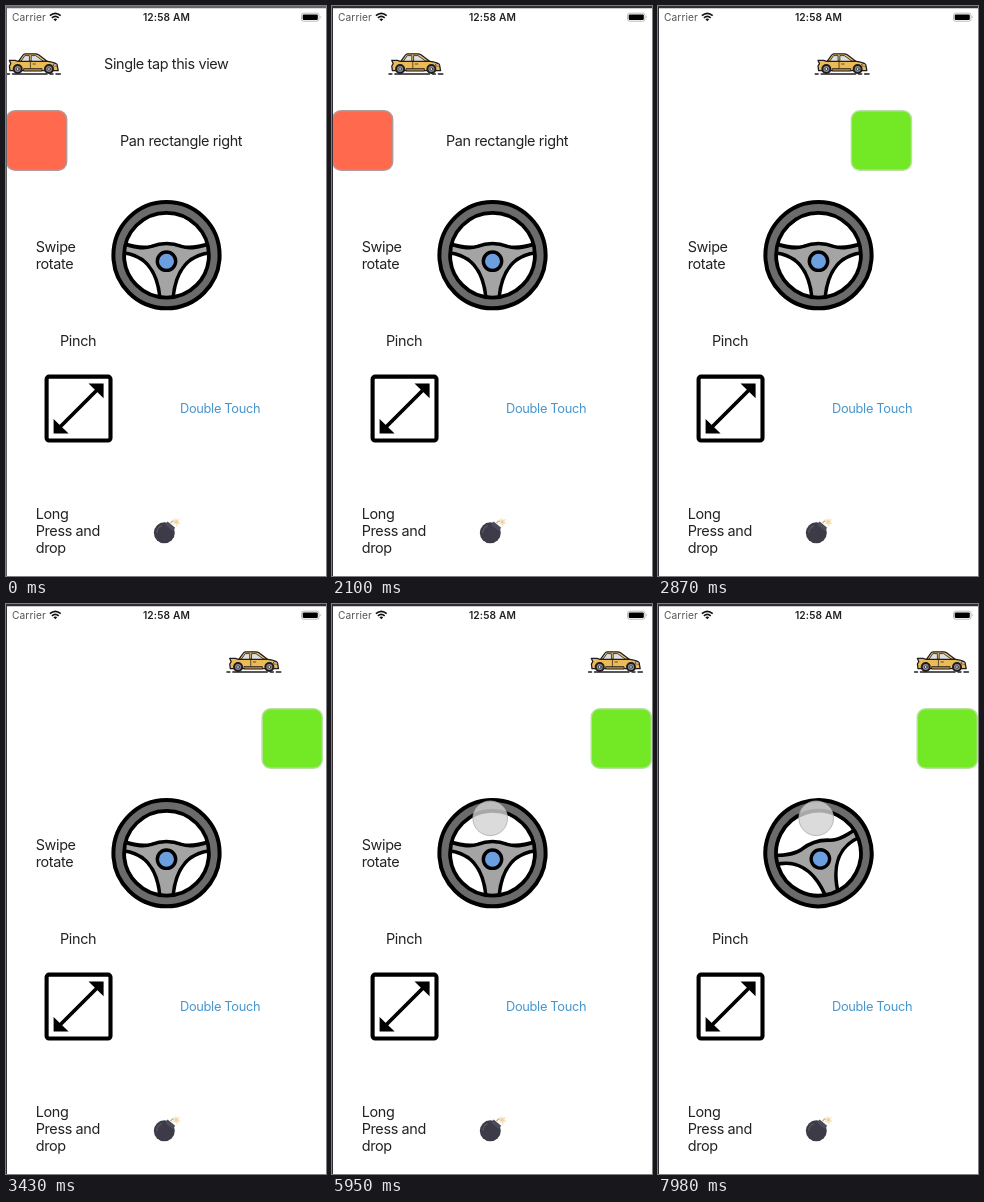
Animation of 320x570 px, one loop 8 s. Source, as an HTML page:

```html
<!DOCTYPE html>
<html lang="en">
<head>
<meta charset="utf-8">
<title>Gesture demo</title>
<style>
  html, body { margin: 0; width: 100%; height: 100%; overflow: hidden; background: #fff; }
  svg { display: block; width: 100vw; height: 100vh; }
  text { font-family: Inter, "Liberation Sans", sans-serif; font-size: 14.4px; letter-spacing: -.35px; fill: #222; }
  .status { font-size: 10.2px; letter-spacing: .1px; fill: #555; }
  .clock { font-size: 10.2px; letter-spacing: .15px; font-weight: 600; text-anchor: middle; }
  .button { font-size: 12.8px; letter-spacing: -.3px; fill: #4795cd; }
</style>
</head>
<body>
<svg viewBox="0 0 320 570">
  <rect width="320" height="570" fill="#fff"/>

  <!-- status bar -->
  <text class="status" x="6" y="15.2">Carrier</text>
  <g fill="none" stroke="#111" stroke-width="1.7">
    <path d="M43.9 9.6Q49.3 5 54.7 9.6M45.9 11.8Q49.3 8.9 52.7 11.8"/>
    <path d="M47.4 13.2Q49.3 11.6 51.2 13.2L49.3 15.2Z" fill="#111" stroke="none"/>
  </g>
  <text class="clock" x="160.5" y="15.2">12:58 AM</text>
  <rect x="295.5" y="7.2" width="17.5" height="8" rx="2.2" fill="#fff" stroke="#aaa" stroke-width=".8"/>
  <rect x="296.7" y="8.4" width="15.1" height="5.6" rx="1.2" fill="#000"/>
  <path d="M314.2 9.8q1.3 1.4 0 2.8z" fill="#999"/>

  <text id="tapLabel" x="98" y="63">Single tap this view</text>
  <text id="panLabel" x="114" y="140">Pan rectangle right</text>
  <g id="swipeLabel">
    <text x="29.7" y="246">Swipe</text>
    <text x="29.7" y="263">rotate</text>
  </g>
  <text x="54" y="339.8">Pinch</text>
  <text class="button" x="174" y="407.3">Double Touch</text>
  <text x="29.7" y="513">Long</text>
  <text x="29.7" y="530">Press and</text>
  <text x="29.7" y="547">drop</text>

  <rect id="box" x=".5" y="104.8" width="60.2" height="59.4" rx="8.5" stroke-width="1.4"/>

  <g id="car" stroke="#1f1d20" stroke-width="1.3" stroke-linejoin="round" stroke-linecap="round">
    <path d="M.6 68H3.5M6.5 68H41M44 68H47M50 68H54.4" fill="none" stroke-width="1.5"/>
    <path d="M12.5 55.4L17 49Q17.7 47.8 19.2 47.8H29.5Q31.2 47.8 32.6 48.8L41.5 55.4Z" fill="#f0c465"/>
    <path d="M15 55.2L18.9 49.6H23.4V55.2ZM25.2 55.2V49.6H29.6L37.4 55.2Z" fill="#dcdfe3" stroke-width=".8"/>
    <path d="M3.4 54.4H9L12 55.4H41.5Q48.5 56.2 51 58.4L52.2 64.6H4L3.4 60L4.8 57.6Z" fill="#ecbb55"/>
    <path d="M18 62.6H36V65H18Z" fill="#a9803f" stroke-width=".8"/>
    <path d="M24.4 56V62M27 58H29.4" fill="none" stroke-width=".7"/>
    <path d="M47.4 58H50.4L51.2 60H48Z" fill="#f8edcf" stroke-width=".6"/>
    <g fill="#8c8d94" stroke-width="2">
      <circle cx="11.7" cy="63" r="4"/>
      <circle cx="43" cy="63" r="4"/>
    </g>
    <g fill="#e8e8ea" stroke-width=".7">
      <circle cx="11.7" cy="63" r="1.4"/>
      <circle cx="43" cy="63" r="1.4"/>
    </g>
  </g>

  <!-- steering wheel, drawn around its own centre -->
  <clipPath id="inside"><circle r="43"/></clipPath>
  <g id="wheel" stroke="#000">
    <path clip-path="url(#inside)" fill="#a4a4a4" stroke-width="3.6" stroke-linejoin="round"
      d="M-46 -12.5C-34 -8.5 -24 -6 -15 -8.8Q0 -14.5 15 -8.8C24 -6 34 -8.5 46 -12.5L46 -2.5C24 -1.5 8.5 13 6.3 46H-6.3C-8.5 13 -24 -1.5 -46 -2.5Z"/>
    <circle cy="6" r="9.2" fill="#6c9fdf" stroke-width="3.4"/>
    <g fill="none">
      <circle r="47.5" stroke="#6b6b6b" stroke-width="9"/>
      <circle r="53.1" stroke-width="4"/>
      <circle r="42.4" stroke-width="3.8"/>
    </g>
  </g>

  <!-- pinch icon -->
  <rect x="40.6" y="370.6" width="63.9" height="63.9" rx="2.5" fill="#fff" stroke="#000" stroke-width="4.1"/>
  <path d="M53 422L92 383" stroke="#000" stroke-width="3.8"/>
  <path d="M97.6 377.6H82.5L97.6 392.2ZM47.6 427.6V413L62.6 427.6Z"/>

  <!-- bomb -->
  <path d="M164.5 517Q167 513.5 170 515.5" fill="none" stroke="#cbb497" stroke-width="1.4"/>
  <circle cx="158.3" cy="526.8" r="10.5" fill="#3c3b47"/>
  <path d="M161.6 515.5L169.2 521.8L166.7 525.1L159.1 518.8Z" fill="#4c4b58"/>
  <path d="M150.8 526.4Q151.4 521.4 155.4 519.8" fill="none" stroke="#56555f" stroke-width="1.4" stroke-linecap="round"/>
  <path d="M169.8 511L170.9 513.8L174 512.8L172.7 515.6L174.6 518L171.8 518L171 521L169.2 518.2L166.2 518.2L168 515.8L166.4 513L169.2 513.8Z" fill="#f7e6c4"/>
  <circle cx="170.3" cy="516" r="1.4" fill="#efcf98"/>

  <circle id="touch" cx="158.2" cy="214.3" r="17.3" fill="#d3d3d3" fill-opacity=".8" stroke="#ababab" stroke-width=".8"/>

  <path id="edge" d="M0 0H320V2.2H1V570H0Z"/>
</svg>
<script>
  const LOOP = 8000, STEP = 70;
  const TAP = 1060, PAN = 2200, TOUCH = 5600, SWIPE = 6650;
  const el = id => document.getElementById(id);
  const [tapLabel, panLabel, swipeLabel, box, car, wheel, touch, edge] =
    ["tapLabel", "panLabel", "swipeLabel", "box", "car", "wheel", "touch", "edge"].map(el);

  const progress = (t, start, length) => Math.min(1, Math.max(0, (t - start) / length));
  const show = (node, on) => node.setAttribute("visibility", on ? "visible" : "hidden");
  const move = (node, value) => node.setAttribute("transform", value);

  // cubic-bezier(.42, 0, .58, 1)
  function easeInOut(x) {
    let lo = 0, hi = 1, s = x;
    for (let i = 0; i < 24; i++) {
      s = (lo + hi) / 2;
      const bx = 1.26 * s * (1 - s) ** 2 + 1.74 * s * s * (1 - s) + s ** 3;
      if (bx < x) lo = s; else hi = s;
    }
    return s * s * (3 - 2 * s);
  }

  const easeOut = x => 1 - (1 - x) ** 2.1;

  function draw(t) {
    const panned = t >= PAN;
    show(tapLabel, t < TAP);
    show(panLabel, !panned);
    show(swipeLabel, t < SWIPE);
    show(touch, t >= TOUCH);
    edge.setAttribute("fill", t < TAP ? "#656466" : "#302e33");

    move(car, `translate(${256 * easeInOut(progress(t, TAP, 3200))})`);
    move(box, `translate(${258.7 * easeOut(progress(t, PAN, 1400))})`);
    box.setAttribute("fill", panned ? "#73e825" : "#ff694d");
    box.setAttribute("stroke", panned ? "#b9dfa5" : "#b29a98");
    move(wheel, `translate(160.5 249.2) rotate(${-18 * easeInOut(progress(t, SWIPE, 1000))})`);
  }

  const origin = performance.now();
  function tick() {
    const t = (performance.now() - origin) % LOOP;
    draw(Math.floor(t / STEP) * STEP);
    requestAnimationFrame(tick);
  }
  tick();
</script>
</body>
</html>
```
